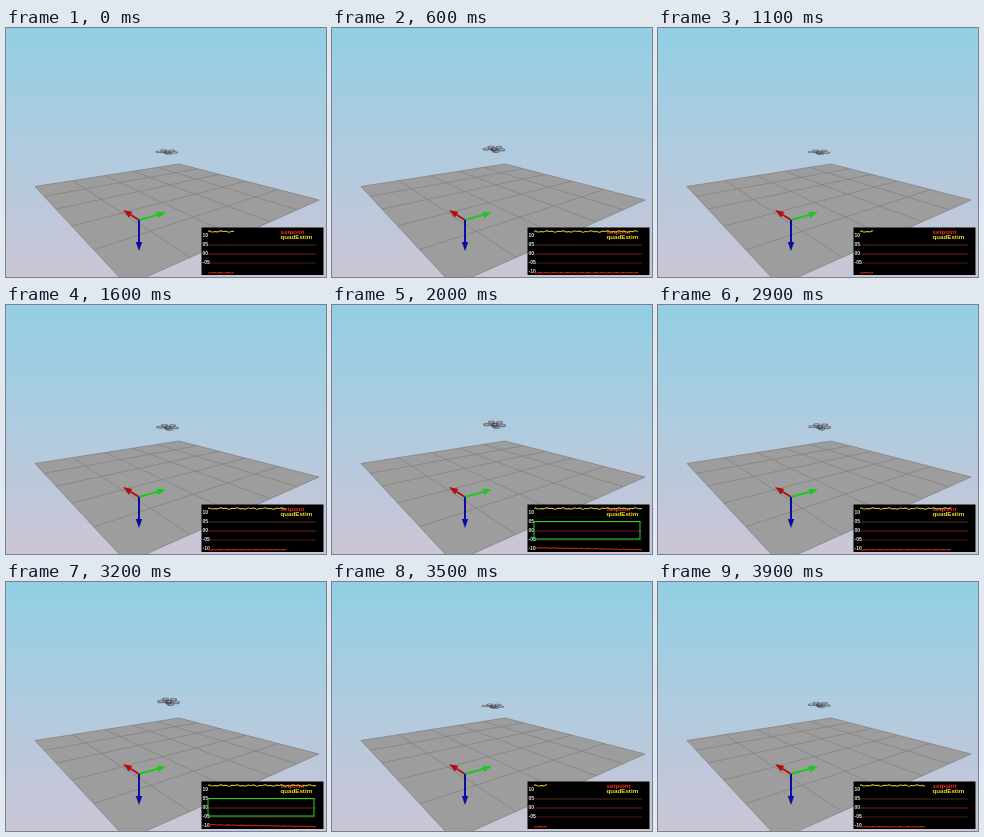
An HTML page with a canvas for the animation above (4 s loop, 320 by 249 pixels).

```html
<!DOCTYPE html>
<html lang="en">
<head>
<meta charset="utf-8">
<title>Hovering quadrotor</title>
<style>
html, body { margin: 0; width: 100%; height: 100%; overflow: hidden; }
canvas { display: block; width: 320px; height: 249px; }
</style>
</head>
<body>
<canvas id="stage"></canvas>
<script>
const W = 320, H = 249, LOOP = 4000, STEP = 100, CYCLE = 1200, OFFSET = 200;
const canvas = document.getElementById('stage');
const ratio = window.devicePixelRatio || 1;
canvas.width = W * ratio;
canvas.height = H * ratio;
const c = canvas.getContext('2d');
c.scale(ratio, ratio);

function path(points, color, width, fill) {
  c.beginPath();
  points.forEach(([x, y]) => c.lineTo(x, y));
  if (fill) {
    c.fillStyle = color;
    c.fill();
  } else {
    c.strokeStyle = color;
    c.lineWidth = width;
    c.stroke();
  }
}

function ellipse(x, y, rx, ry, color) {
  c.fillStyle = color;
  c.beginPath();
  c.ellipse(x, y, rx, ry, 0, 0, Math.PI * 2);
  c.fill();
}

function text(string, x, y, color, font) {
  c.fillStyle = color;
  c.font = font;
  c.fillText(string, x, y);
}

// Perspective map from the unit square to the four corners of the floor
function perspective([a, b, d, e]) {
  const [x1, y1] = [b[0] - d[0], b[1] - d[1]];
  const [x2, y2] = [e[0] - d[0], e[1] - d[1]];
  const [x3, y3] = [a[0] - b[0] + d[0] - e[0], a[1] - b[1] + d[1] - e[1]];
  const det = x1 * y2 - x2 * y1;
  const g = (x3 * y2 - x2 * y3) / det;
  const h = (x1 * y3 - x3 * y1) / det;
  return (u, v) => [0, 1].map(i =>
    (a[i] + u * (b[i] - a[i] + g * b[i]) + v * (e[i] - a[i] + h * e[i])) / (1 + g * u + h * v));
}

const corners = [[29, 158.5], [173, 136], [313, 172], [121, 257.5]];
const floorPoint = perspective(corners);

function drawScene() {
  const sky = c.createLinearGradient(0, 0, 0, H);
  sky.addColorStop(0, '#92cfe3');
  sky.addColorStop(0.5, '#b0cbdf');
  sky.addColorStop(1, '#cbc5d5');
  c.fillStyle = sky;
  c.fillRect(0, 0, W, H);

  path(corners, '#9d9d9e', 0, true);
  const cells = 5;
  for (let i = 0; i <= cells; i++) {
    const k = i / cells;
    path([floorPoint(k, 0), floorPoint(k, 1)], '#838384', 0.8);
    path([floorPoint(0, k), floorPoint(1, k)], '#838384', 0.8);
  }
}

function arrow(x, y, color) {
  const ox = 133, oy = 192;
  const len = Math.hypot(x - ox, y - oy);
  const dx = (x - ox) / len, dy = (y - oy) / len;
  const bx = x - dx * 9, by = y - dy * 9;
  path([[ox, oy], [bx, by]], color, 2);
  path([[x, y], [bx - dy * 3.2, by + dx * 3.2], [bx + dy * 3.2, by - dx * 3.2]], color, 0, true);
}

function drawDrone(phase) {
  const rise = (phase / 1000) ** 1.7;
  c.save();
  c.translate(160.7 + 1.8 * rise, 124.2 - 4.7 * rise);
  c.scale(1, 0.65 + 0.4 * rise);
  path([[-8, 0.5], [8, 1]], '#5e636e', 1.3);
  path([[-4, -2.4], [4, 2.6]], '#555a64', 1.2);
  for (const [x, y] of [[-3, -2.2], [5, -1.8], [-7.8, 0], [7.8, 0.9], [2, 2.7]]) {
    ellipse(x, y, 3.6, 1.7, '#6e7480');
    ellipse(x, y - 0.2, 2, 0.8, '#a2a9b6');
  }
  ellipse(0, 0.6, 3.5, 2.3, '#4d515b');
  ellipse(0.5, 0, 1.5, 0.8, '#9197a3');
  c.restore();
}

function trace(end, color, width, curve) {
  const points = [];
  for (let x = 202; x <= end; x++) points.push([x, curve(x)]);
  path(points, color, width);
}

function drawPlot(phase) {
  const end = Math.min(310, 202 + phase * 0.131);
  c.fillStyle = '#000';
  c.fillRect(195.5, 199.5, 122, 47.5);

  [217, 226, 235].forEach((y, i) =>
    path([[202, y], [310, y]], ['#59331f', '#802020', '#552020'][i], 0.9));

  const labels = ['10', '05', '00', '-05'];
  if (phase >= 300) labels.push('-10');
  labels.forEach((label, i) =>
    text(label, 196.5, 209 + i * 9.1, '#e4e4e4', 'bold 5px "Liberation Sans", sans-serif'));

  const legend = 'bold 6.2px "Liberation Sans", sans-serif';
  text('setpoint', 274.5, 206, '#ee2a12', legend);
  text('quadEstim', 274.5, 211, '#f0dc28', legend);

  trace(end, '#c9bd2c', 1.1, x =>
    203.5 + 0.4 * Math.sin(x * 0.43) + 0.35 * Math.sin(x * 1.13 + 1));
  trace(end, '#c22a14', 1.1, x =>
    (phase >= 900 ? 242.7 + (x - 202) * 0.018 : 244.8) + 0.2 * Math.sin(x * 0.9));

  if (phase >= 900) {
    c.strokeStyle = '#22d32a';
    c.lineWidth = 1;
    c.strokeRect(202, 216.5, 106, 17.5);
  }
}

function draw(now) {
  const time = Math.floor((now % LOOP) / STEP) * STEP;
  const phase = (time + OFFSET) % CYCLE;
  drawScene();
  arrow(117, 182, '#b40c10');
  arrow(160, 184.5, '#16c91c');
  arrow(133, 223, '#0b0ba4');
  drawDrone(phase);
  drawPlot(phase);
  requestAnimationFrame(draw);
}

const start = performance.now();
requestAnimationFrame(() => draw(0));
function draw0() {}
</script>
</body>
</html>
```
